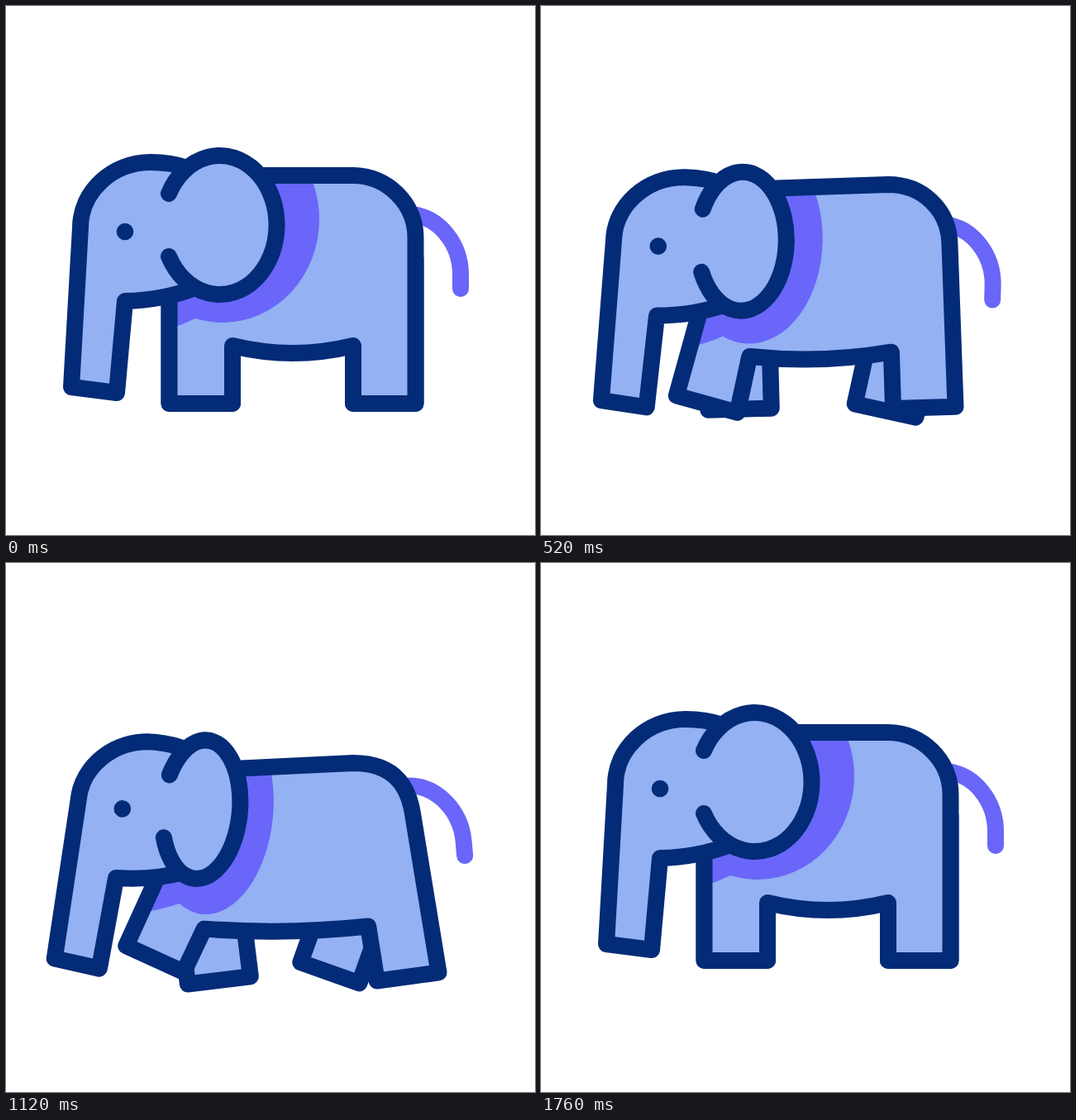
These frames come from a looping animation (640x640 px, 2 s). An HTML page:

```html
<!DOCTYPE html>
<html lang="en">
<head>
<meta charset="utf-8">
<title>Walking elephant</title>
<style>
  html, body { margin: 0; width: 100%; height: 100%; overflow: hidden; background: #fff; }
  svg { display: block; width: 100%; height: 100%; }
  .line { stroke: #032b77; stroke-width: 20; stroke-linecap: round; stroke-linejoin: round; }
  .skin { fill: #93b1f3; }
  .open { fill: none; }
  .shade { fill: #6966f9; }
  .tail { fill: none; stroke: #6966f9; stroke-width: 20; stroke-linecap: round; }
  .eye { fill: #032b77; }
</style>
</head>
<body>
<svg viewBox="0 0 640 640">
  <defs><clipPath id="bodyClip"><path id="clipShape"/></clipPath></defs>
  <path id="tail" class="tail" d="M0 0C34 3 60 36 60 73V90"/>
  <path id="farFront" class="line skin"/>
  <path id="farHind" class="line skin"/>
  <path id="bodyFill" class="skin"/>
  <g clip-path="url(#bodyClip)">
    <g id="shadow" class="shade">
      <ellipse id="earShadow" ry="125"/>
      <path d="M-10 50V129Q45 125 85 105L120 50Z"/>
    </g>
  </g>
  <path id="bodyLine" class="line open"/>
  <g id="head">
    <path class="line skin" d="M75-77Q56-84 31-84C-16-84-54-48-54-5L-65 188L-10 195L0 84Q46 83 85 68"/>
    <path id="ear" class="line skin"/>
    <circle class="eye" r="10.3"/>
  </g>
</svg>
<script>
const LOOP = 2000, STEP = 40, END = 1760;
const el = id => document.getElementById(id);

// reach: near front leg, degrees; push: near hind leg, degrees;
// dip: drop of the back, px; squash: how far the ear folds; nod: head, degrees
const stand   = { reach: 0,    push: 0,    dip: 0,  squash: 0,    nod: 0 };
const lean    = { reach: 14,   push: -4.5, dip: 18, squash: .24,  nod: 13.9 };
const stretch = { reach: 24.5, push: -7,   dip: 37, squash: .32,  nod: 5.3 };
const recover = { reach: 15.5, push: -1.5, dip: 11, squash: .22,  nod: 1.2 };
const shove   = { reach: -15,  push: 15,   dip: 0,  squash: .045, nod: 1.3 };
const settle  = { reach: 7.7,  push: -2,   dip: 10, squash: .185, nod: -8.2 };

const walk = [
  [0, stand], [200, lean], [360, stretch], [520, recover], [760, shove],
  [960, lean], [1120, stretch], [1440, settle], [END, stand]
];

// Smooth curve through the poses, at rest at both ends
function follow(t, key) {
  const last = walk.length - 1;
  const time = k => walk[k][0], value = k => walk[k][1][key];
  const slope = k => k === 0 || k === last ? 0
    : (value(k + 1) - value(k - 1)) / (time(k + 1) - time(k - 1));
  let i = 0;
  while (i < last - 1 && t >= time(i + 1)) i++;
  const d = time(i + 1) - time(i), u = (t - time(i)) / d, w = 1 - u;
  return value(i) * w * w * (1 + 2 * u) + value(i + 1) * u * u * (3 - 2 * u)
    + d * u * w * (slope(i) * w - slope(i + 1) * u);
}

// Point seen from a foot corner: along the sole and up the leg
function offset([x, y, deg], along, up) {
  const a = deg * Math.PI / 180, c = Math.cos(a), s = Math.sin(a);
  return [x + along * c + up * s, y + along * s - up * c];
}

const line = pts => pts.map(p => p.map(v => v.toFixed(2)).join(' ')).join('L');

const leg = (foot, width, height) =>
  `M${line([offset(foot, 0, height), offset(foot, 0, 0), offset(foot, width, 0), offset(foot, width, height)])}Z`;

function bodyPath(front, hind, bellyA, bellyB, rump, backY, squash) {
  const [ax, ay] = bellyA, [bx, by] = bellyB, [rx, ry] = rump, lift = 41;
  const bendX = Math.min(rx, rx + (rx - hind[0]) * lift / (hind[1] - ry));
  return `M${line([offset(front, 0, 128), offset(front, 0, 0), offset(front, 76.5, 0), bellyA])}`
    + `Q${(ax + bx) / 2} ${(ay + by) / 2 + 18 - 28 * squash} ${bx} ${by}`
    + `L${line([offset(hind, -75.5, 0), offset(hind, 0, 0), rump])}`
    + `C${bendX} ${ry - lift} ${420 + lift} ${backY} 420 ${backY}L285 ${backY + 20 * squash}`;
}

const set = (id, attrs) => {
  for (const k in attrs) el(id).setAttribute(k, attrs[k]);
};
const place = (x, y, deg) => `translate(${x} ${y}) rotate(${deg})`;

function draw(t) {
  const [reach, push, dip, squash, nod] = Object.keys(stand).map(key => follow(t, key));
  const ahead = Math.max(reach, 0), back = Math.max(push, 0), sway = Math.abs(reach);
  const slide = back / 2;
  const ground = .4 * nod;
  const sink = .5 * dip - 1.13 * push + ground;

  const [kneeX, kneeY] = offset([197.5, 355, reach], 0, -126);
  const front = [kneeX - back, kneeY - .35 * reach + ground, reach];
  const farFront = [197.5 - 3.2 * push, 481 + sink, push];
  const hind = [495.5 - 4 * push, 481 + .3 * dip + .025 * push * push + ground, 1.1 * push];
  const farHind = [420 - 2.6 * reach, 481 + ground, .8 * reach];
  const bellyA = [274 - 1.4 * ahead, 411 + .5 * dip + .45 * sway + ground];
  const bellyB = [420 - 2.6 * push, 411 + sink];
  const rump = [495.5 - .1 * dip - .3 * back, 280 + .6 * dip + .4 * back];

  const body = bodyPath(front, hind, bellyA, bellyB, rump, 205 + dip, squash);
  for (const id of ['clipShape', 'bodyFill', 'bodyLine']) set(id, { d: body });
  set('farFront', { d: leg(farFront, 76.5, 120) });
  set('farHind', { d: leg(farHind, 75.5, 176) });

  const head = place(144 - .15 * sway + .1 * nod, 273 + 82 * squash - .35 * nod - slide / 2, nod);
  set('head', { transform: head });
  set('shadow', { transform: head });
  set('ear', { d: `M53-46A${69 * (1 - squash)} 84 0 1 1 53 30` });
  set('earShadow', {
    cx: 118 - 30 * squash + slide,
    cy: -15 + 25 * squash + slide,
    rx: 117 - 135 * squash
  });
  set('tail', {
    transform: place(490 - .1 * sway, 252 + 55 * squash, 20 * squash - 1.1 * nod - .15 * dip + .4 * slide)
  });
}

const start = performance.now();
function tick() {
  const t = (performance.now() - start) % LOOP;
  draw(Math.min(END, Math.floor(t / STEP) * STEP));
  requestAnimationFrame(tick);
}
tick();
</script>
</body>
</html>
```
